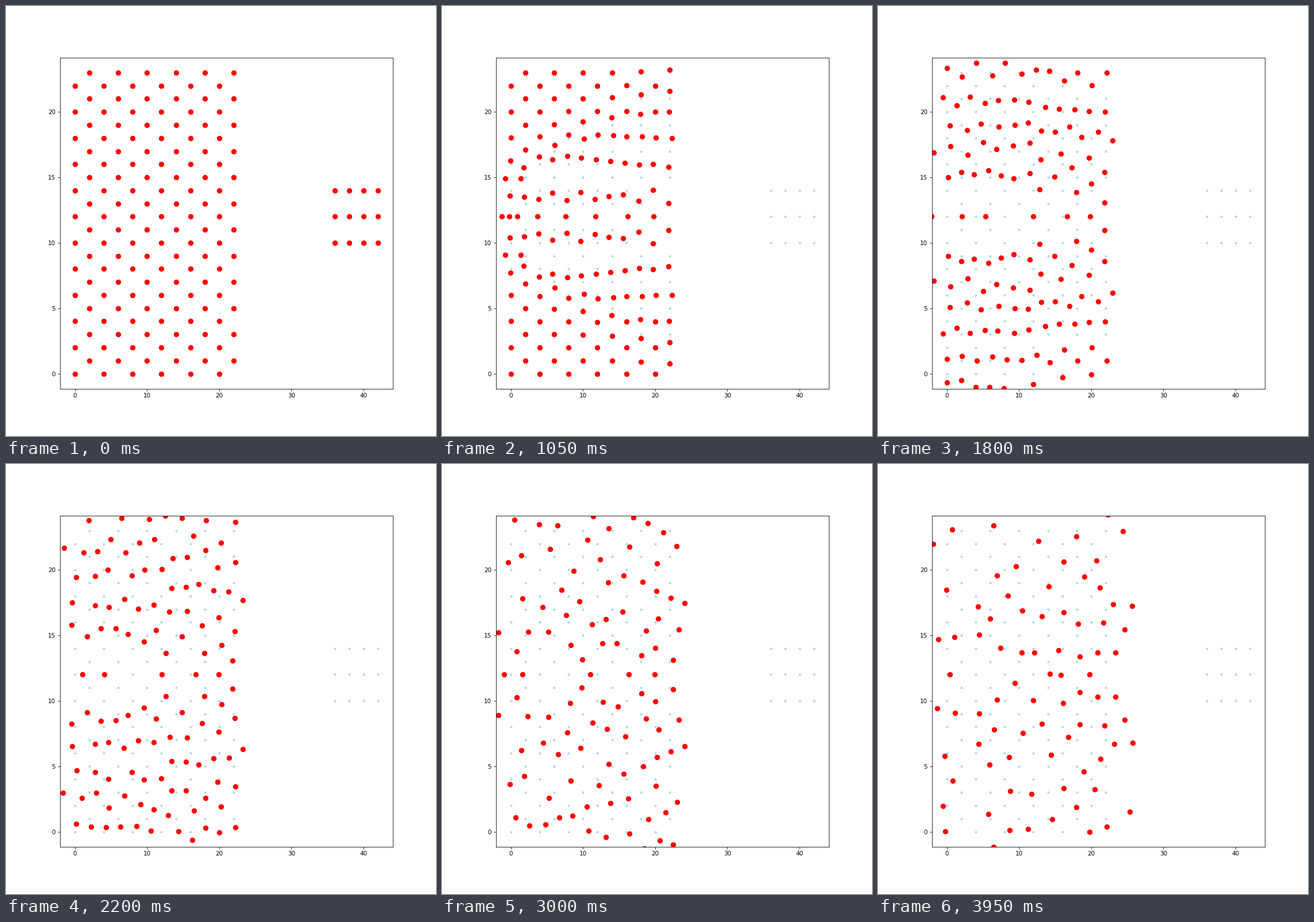
These frames come from a looping animation (748 px wide and 748 px high, 4 s). A matplotlib script:

```python
import numpy as np
import matplotlib.pyplot as plt
from matplotlib.animation import FuncAnimation

FRAMES, INTERVAL = 80, 50
DIAMETER = 2.0      # discs repel when closer than this
STIFFNESS = 0.1     # per unit mass, time in frames
SPEED = 2.0         # projectile speed per frame
STEPS = 25          # integration steps per frame


def start():
    plate = [(x, y + x // 2 % 2) for x in range(0, 24, 2) for y in range(0, 24, 2)]
    block = [(x, y) for x in range(36, 44, 2) for y in range(10, 16, 2)]
    pos = np.array(plate + block, float)
    vel = np.zeros_like(pos)
    vel[len(plate):, 0] = -SPEED
    return pos, vel


def accel(pos):
    """Linear contact repulsion between overlapping discs."""
    x, y = pos.T
    dx = x[:, None] - x
    dy = y[:, None] - y
    dist = np.sqrt(dx * dx + dy * dy)
    np.fill_diagonal(dist, DIAMETER)
    push = STIFFNESS * np.maximum(DIAMETER - dist, 0) / np.maximum(dist, 1e-9)
    return np.column_stack(((push * dx).sum(1), (push * dy).sum(1)))


def simulate():
    pos, vel = start()
    dt = 1 / STEPS
    acc = accel(pos)
    states = [pos.copy()]
    for _ in range(FRAMES - 1):
        for _ in range(STEPS):
            vel += acc * dt / 2
            pos += vel * dt
            acc = accel(pos)
            vel += acc * dt / 2
        states.append(pos.copy())
    return states


states = simulate()

fig, ax = plt.subplots(figsize=(10, 10), dpi=74.8)
ax.plot(*states[0].T, ".", color="lightblue", markersize=6)
discs, = ax.plot(*states[0].T, "ro", markersize=8)
ax.set_xlim(-2.1, 44.1)
ax.set_ylim(-1.15, 24.15)


def update(i):
    discs.set_data(*states[i].T)
    return discs,


anim = FuncAnimation(fig, update, frames=FRAMES, interval=INTERVAL,
                     repeat=True, repeat_delay=0)
plt.show()
```
